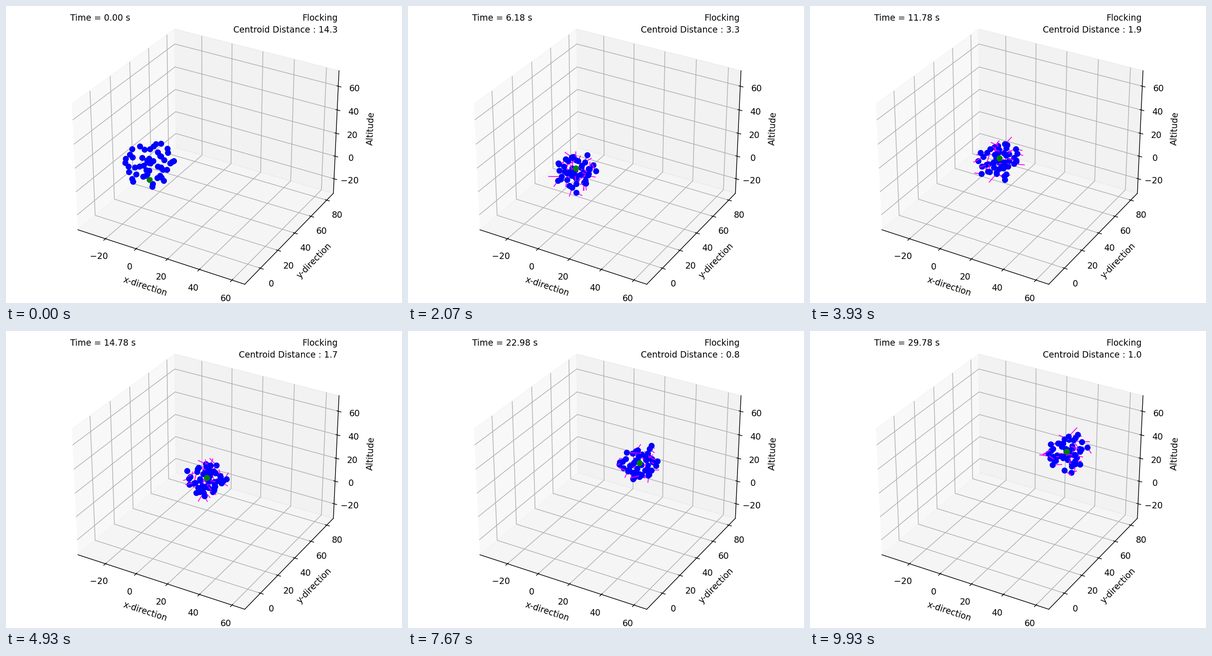
Animation, 864 px wide and 648 px high, one loop 9.99 s. Source, as a matplotlib script:

```python
import numpy as np
import matplotlib.pyplot as plt
from matplotlib.animation import FuncAnimation

W, H, DPI = 864, 648, 135
FRAMES = 150
LOOP = 9990
DRONES = 50
GROUPS = 5
SPAN = 106        # edge of the cubic view volume
RADIUS = 16       # flock radius at rest
SWING = 3         # radius of each drone's own circling

# (seconds, gap) from target to flock centroid; negative after overshooting
GAP_KEYS = [(0, 14.3), (2.4, -4.9), (3.58, -4.6), (8.78, -2.1),
            (14.78, -1.7), (19.78, -0.8), (26.18, -0.8), (29.78, -1.0)]

fig = plt.figure(figsize=(W / DPI, H / DPI), dpi=DPI)
ax = fig.add_axes([0, 0, 1, 1], projection="3d")
for name, low, first_tick, label in [("x", -38.27, -20, "x-direction"),
                                     ("y", -17.35, 0, "y-direction"),
                                     ("z", -33.05, -20, "Altitude")]:
    ax.set(**{f"{name}ticks": np.arange(5) * 20 + first_tick,
              f"{name}lim": (low, low + SPAN),
              f"{name}label": label})
ax.apply_aspect()

CAMERA = ax.get_proj()[[0, 1, 3]]


def unproject(px, py, depth):
    """Point in space seen at a stage pixel, at a given camera distance."""
    x, y = ax.transData.inverted().transform((px, H - py))
    rhs = np.array([x * depth, y * depth, depth]) - CAMERA[:, 3]
    return np.linalg.solve(CAMERA[:, :3], rhs)


def normalize(v):
    return v / np.linalg.norm(v, axis=-1, keepdims=True)


def ball(rng, n):
    """Evenly spread directions with random radii, filling a unit ball."""
    k = np.arange(n) + 0.5
    z = 1 - 2 * k / n
    turn = k * np.pi * (3 - np.sqrt(5))
    ring = np.sqrt(1 - z * z)
    shell = np.stack([ring * np.cos(turn), ring * np.sin(turn), z], axis=1)
    return shell * np.cbrt(rng.uniform(0, 1, (n, 1)))


rng = np.random.default_rng(7)
spread = RADIUS * ball(rng, DRONES)
spread -= spread.mean(axis=0)
swing_a = normalize(rng.normal(size=(DRONES, 3)))
swing_b = normalize(rng.normal(size=(DRONES, 3)))
rate = rng.uniform(1.2, 2.2, (DRONES, 1))
phase = rng.uniform(0, 2 * np.pi, (DRONES, 1))

target_from = unproject(313, 379, 9.9)
target_to = unproject(560.5, 262.5, 10.24)
gap_dir = normalize(unproject(314, 344.5, 9.83) - target_from)


def flock(i, t):
    """Target, centroid, drone places, drone velocities and centroid gap."""
    target = target_from + (target_to - target_from) * i / (FRAMES - 1)
    gap = np.interp(t, *zip(*GAP_KEYS))
    centroid = target + gap * gap_dir

    reach = SWING * (1 - np.exp(-t))
    angle = rate * t + phase
    swing = swing_a * np.cos(angle) + swing_b * np.sin(angle)
    speed = rate * (swing_b * np.cos(angle) - swing_a * np.sin(angle))
    size = 0.75 + 0.25 * np.exp(-t / 2)
    offset = size * spread + reach * swing
    drones = centroid + offset - offset.mean(axis=0)
    return target, centroid, drones, reach * speed, abs(gap)


def line(style, **kw):
    return ax.plot([], [], [], style, **kw)[0]


star = line("k*")
layers = [(line("-", color="magenta", lw=1), line("bo")) for _ in range(GROUPS)]
goal = line("go")

clock = ax.text2D(0.05, 0.95, "", transform=ax.transAxes)
ax.text2D(0.95, 0.95, "Flocking", transform=ax.transAxes, ha="right")
readout = ax.text2D(0.95, 0.91, "", transform=ax.transAxes, ha="right")


def update(i):
    t = max(0.0, 0.2 * i - 0.02)
    target, centroid, drones, velocity, gap = flock(i, t)
    star.set_data_3d(*centroid[:, None])
    goal.set_data_3d(*target[:, None])
    for k, (trails, dots) in enumerate(layers):
        p, v = drones[k::GROUPS], velocity[k::GROUPS]
        dots.set_data_3d(*p.T)
        # NaN rows separate the strokes
        strokes = np.stack([p, p + v, np.full_like(p, np.nan)], axis=1)
        trails.set_data_3d(*strokes.reshape(-1, 3).T)
        trails.set_visible(t > 0)
    clock.set_text(f"Time = {t:.2f} s")
    readout.set_text(f"Centroid Distance : {gap:.1f}")
    return star, goal, clock, readout


anim = FuncAnimation(fig, update, frames=FRAMES, interval=LOOP / FRAMES,
                     init_func=lambda: update(0), repeat=True)
plt.show()
```
